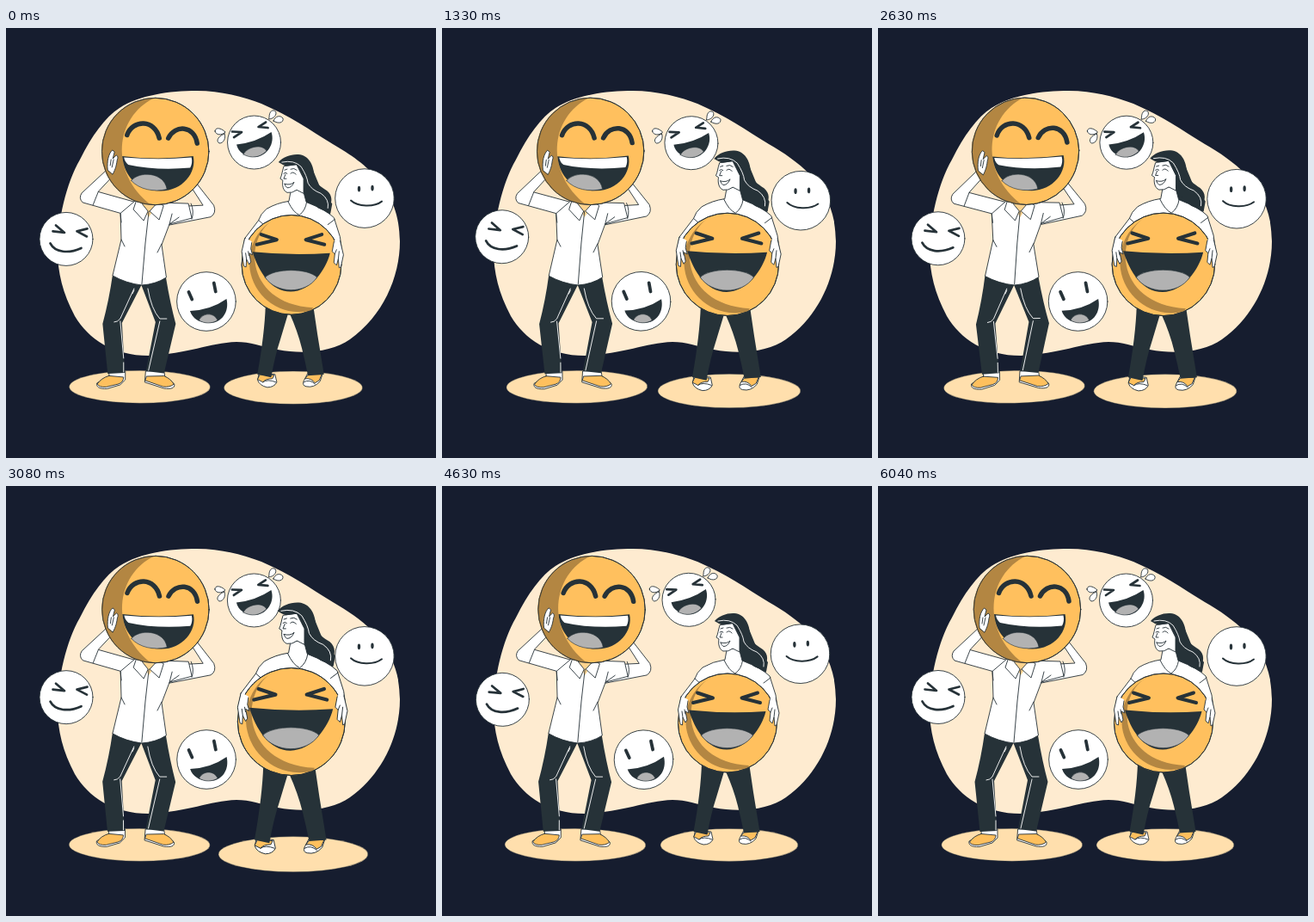
Animation, 500 px wide and 500 px high, one loop 6.08 s. Source, as an HTML page:

```html
<!DOCTYPE html>
<html lang="en">
<head>
<meta charset="utf-8">
<title>Laughing faces</title>
<style>
html, body { margin: 0; width: 100%; height: 100%; overflow: hidden; background: #161d2f; }
svg { display: block; width: 100vw; height: 100vh; stroke-linecap: round; stroke-linejoin: round; }
.w { fill: #fff; stroke: #263238; stroke-width: .9; }
.d { fill: #263238; }
.y { fill: #ffc05e; stroke: #263238; stroke-width: .9; }
.s { fill: #b38642; }
.g { fill: #b2b2b2; stroke: #263238; stroke-width: .6; }
.l { fill: none; stroke: #263238; stroke-width: .9; }
.b { fill: none; stroke: #263238; stroke-width: 2.7; }
.c { fill: none; stroke: #fff; stroke-width: .9; }
.p { fill: #ffdfad; stroke: #263238; stroke-width: .4; }
</style>
</head>
<body>
<svg viewBox="0 0 500 500">
  <path fill="#feebd0" d="M222 73C250 73 276 80 297 88C330 102 354 119 380 135C420 158 458 188 458 248C458 290 438 335 400 362C380 376 348 380 316 374C296 370 284 365 268 365C236 366 212 379 166 381C125 381 96 362 80 335C66 308 60 285 60 258C60 225 70 180 86 153C100 125 115 104 132 93C155 78 190 73 222 73Z"/>

  <g id="faces">
    <circle class="w" cx="70" cy="245.5" r="31"/>
    <path class="b" d="M58 229.5L68 238L54.5 236.500M94.500 233.500L82.500 236.500L94 242.500M51.500 250.500C57 261.500 73 262.500 87.500 256"/>

    <circle class="w" cx="288.5" cy="133" r="31"/>
    <path class="b" d="M263 120.500L274 121L265 127M302 109.500L293.500 115L304.500 116"/>
    <path class="d" d="M268 135.500Q291 133 308.500 121C313 134 304 149 290 150C279 150 270 145 268 135.500Z"/>
    <path class="g" d="M276 147C280 138 298 134 303 143C295 151 285 152 276 147Z"/>
    <path class="w" d="M306 103C306 97 310 94 313.500 97C315 101 312 105 306 106ZM311 108C313 102 319 101 322 105C323 110 317 112 311 108ZM243 120C243 115 250 116 255 121C251 125 244 125 243 120ZM254 123C256 128 253 134 248 134C243 131 248 125 254 123Z"/>

    <circle class="w" cx="233" cy="318" r="34.300"/>
    <path class="b" style="stroke-width:3.800" d="M212.500 307L216.300 315.500M241.800 296.500L243.800 306.500"/>
    <path class="d" d="M214 329Q238 328 256.500 315C260 330 251 343 237 343C225 343 217 338 214 329Z"/>
    <path class="g" d="M224.500 340C228 331 242 330 246 340C239 344 231 344 224.500 340Z"/>

    <circle class="w" cx="417" cy="198" r="34.300"/>
    <ellipse class="d" cx="410.500" cy="187" rx="1.700" ry="3.400"/>
    <ellipse class="d" cx="426" cy="186" rx="1.700" ry="3.400"/>
    <path class="b" style="stroke-width:2" d="M401 200.500C409 208 428 208.500 437 201.500"/>
  </g>

  <g id="man">
    <ellipse class="p" cx="155.800" cy="417.300" rx="82" ry="19"/>
    <!-- shoes and cuffs -->
    <path class="w" d="M120 398L139 399L139 409L133 415L118 419.500C108 420 105 417 106 413L120 405ZM163 399L184 398L185 405L196 414C197 419 192 420 184 419L162 412Z"/>
    <path class="y" d="M120 404.500L137 406Q137 412 131 414L117 417.500Q108 418 106.500 414Q111 407 120 404.500ZM164 405L184 404.500Q192 408 195.500 414Q191 418 183 417L162.500 410Z"/>
    <!-- trousers -->
    <path class="d" d="M124 287L186 290Q191 320 197.500 344L184 401.500L163 399L174 342L157.500 299L135 343L138.500 401L118.500 402L112.500 344Q120 316 124 287Z"/>
    <path class="c" d="M149 303L133 338Q130 342 126 342M133 341L137 384M137 389V400M165 303Q169 327 179 338L187 338M179 341L166 398M149 305L147 309"/>
    <!-- arms and shirt -->
    <path class="w" d="M118 164L88 192Q84 198 89 203L135 216L152 203L107 190.500L127 169ZM221 180L241.500 206Q245 215 238 219.500L190 229L180 205L191 208L229 206L216 186Z"/>
    <path class="w" d="M150 201L133 215.500L134 246L124 288Q140 297 158 299Q174 298 186.500 290L181 252L190 228L216 221L212 204L180 203Z"/>
    <path class="l" d="M101 206L107 191M133 216L134 226M190 228L193 216M190 228L201 220M215 204Q219 213 216 222"/>
    <path fill="#ffd38e" d="M156 202L166 220L177 203Z"/>
    <path class="w" d="M151 202L148 211L160 224L165 213L157 203ZM176 203L167 213L178 223L183 207Z"/>
    <path class="l" d="M166 213L162 250L158 298M181 251L176 261M134 246L138 254"/>
    <!-- big head -->
    <circle class="y" cx="173.500" cy="143.500" r="62.200"/>
    <path class="s" d="M172 81.300C126 104 120 168 168 205.500A62.200 62.200 0 0 1 172 81.300Z"/>
    <circle class="l" cx="173.500" cy="143.500" r="62.200"/>
    <path class="b" style="stroke-width:5.500" d="M140.500 124.500C147 106 173 106 178 128M188.500 128C196 112 219 113 222 134"/>
    <path class="d" d="M135 149Q176 154 217.500 149C222 168 205 189.500 180 189.500C152 189 137 172 135 149Z"/>
    <path fill="#fff" d="M137 150.500Q176 154 215.500 150.500Q217 157 214 162.500Q174 166 142 159Q138 156 137 150.500Z"/>
    <path class="g" d="M145.500 177.500C154 166 184 167 187 187.500C172 191 155 188 145.500 177.500Z"/>
    <path class="w" d="M118 165C117 155 119 146 123.500 142L126 144L124 152L128 148Q131 149 129 154C128 162 126 166 124 170Z"/>
    <path class="l" d="M122 153L121 160M125 153L123 162"/>
  </g>

  <g id="woman">
    <ellipse class="p" cx="334" cy="417.400" rx="80" ry="19"/>
    <!-- shoes and legs -->
    <path class="w" d="M295 400L313 402L315 411Q312 417 304 417Q295 415 293 409ZM351 401L368 401L365 410Q358 418 349 416Q344 415 346 410Z"/>
    <path class="y" d="M296 402L312 403L310 407Q302 407 299 411L293 408ZM352 402L367 402L364 409L359 412Q355 406 348 407Z"/>
    <path class="l" d="M299 411Q304 407 314 411M346 411Q353 407 359 413"/>
    <path class="d" d="M302 322Q301 355 292.500 402L308.500 405.500Q313 380 319 362L328 332H330Q339 352 344 372Q348 388 351 403.500L369.500 402L362 356L357 322Z"/>
    <!-- hair -->
    <path class="d" d="M317 157C322 151 331 147.500 340 148C352 149 357 160 358 170C359 182 366 185 373 190C380 196 379 204 375 209Q379 216 374 223L350 210L335 165L322 160Z"/>
    <!-- body -->
    <path class="w" d="M331 191L329 202Q315 204 303 211Q296 217 294 224L278 245L275 262L282 271L292 246L304 232V238H366L381 250L385 270L391 265L388 243L381 221Q372 212 349 203L345 188Z"/>
    <path class="l" d="M328 202.500Q334 215 341 218Q348 213 349.500 203M294 224L302 231M374 229L382 223"/>
    <!-- head -->
    <path class="w" d="M323 162C321 168 321 172 319 176L322 178C321 183 322 190 327 192Q333 193 338 189L346 193L346 176L338 160Z"/>
    <path class="d" d="M317 157.500C327 152 336 152 342 160L344 172Q348 170 349 176L347 184Q344 190 349 196Q355 203 363 210L377 216L379 205L365 186L356 164L344 150Z"/>
    <path class="c" d="M321 157Q335 154 343 162Q350 173 351 181Q355 189 366 193Q376 200 374 210"/>
    <path class="l" d="M323 170Q325 168 327 170M331 170Q334 167 337 171M324 166L327 165M331 165Q335 163 338 166M325 171L323 176L326 176M324 182Q331 184 335 180Q332 187 327 186.500Q325 185 324 182"/>
    <!-- held ball -->
    <circle class="y" cx="332" cy="275.500" r="57.500"/>
    <path class="s" d="M318 219.700C276 236 274 320 357 325L355 328.200A57.500 57.500 0 0 1 318 219.700Z"/>
    <circle class="l" cx="332" cy="275.500" r="57.500"/>
    <path class="b" style="stroke-width:4" d="M297 240.500L315 246.500L292 252M367 240.500L348.500 246.500L370 252"/>
    <path class="d" d="M287 260.500Q331 265 376.500 262C372 281 354 306.500 331 306.500C308 306.500 294 283 287 260.500Z"/>
    <path class="g" d="M301.500 290C312 279 351 279 361.500 290C348 310 314 309 301.500 290Z"/>
    <!-- hands -->
    <path class="w" d="M278 245L274.500 260L277 277L279.500 278L280 269L283 275L285 272L283 262L287 264L285 257L286 250ZM381 249L379 260L382 263L381 273L384 276L386 269L387 279L389 278L392 264L388 247Z"/>
    <path class="l" d="M279 262L280 269M282 260L283 265M387 260L386 269M384 258L382 263"/>
    <path stroke="#fff" stroke-width="2" d="M279.500 246L285 249M382.500 248L387 247"/>
  </g>
</svg>
<script>
const loop = 6080, lead = 40;
const get = id => document.getElementById(id);
const faces = get("faces"), man = get("man"), woman = get("woman");

// Linear interpolation through [position, value] keys
function track(keys, p) {
  const i = keys.findIndex(k => k[0] > p);
  const [a, u] = keys[i - 1], [b, v] = keys[i];
  return u + (v - u) * (p - a) / (b - a);
}

const sway = [[0, 0], [.25, 1], [.75, -1], [1, 0]];
const beat = [[0, 1], [.1, 1.1], [.3, 1], [.4, 1], [.5, 1.1], [.6, 1], [1, 1]];

function draw() {
  const p = (performance.now() + lead) / loop % 1;
  faces.setAttribute("transform", `rotate(${track(sway, p)} 245 224)`);
  man.setAttribute("transform", `rotate(${track(sway, p * 4 % 1)} 158.5 259)`);
  woman.setAttribute("transform", `translate(334 292.5) scale(${track(beat, p)}) translate(-334 -292.5)`);
  requestAnimationFrame(draw);
}
draw();
</script>
</body>
</html>
```
